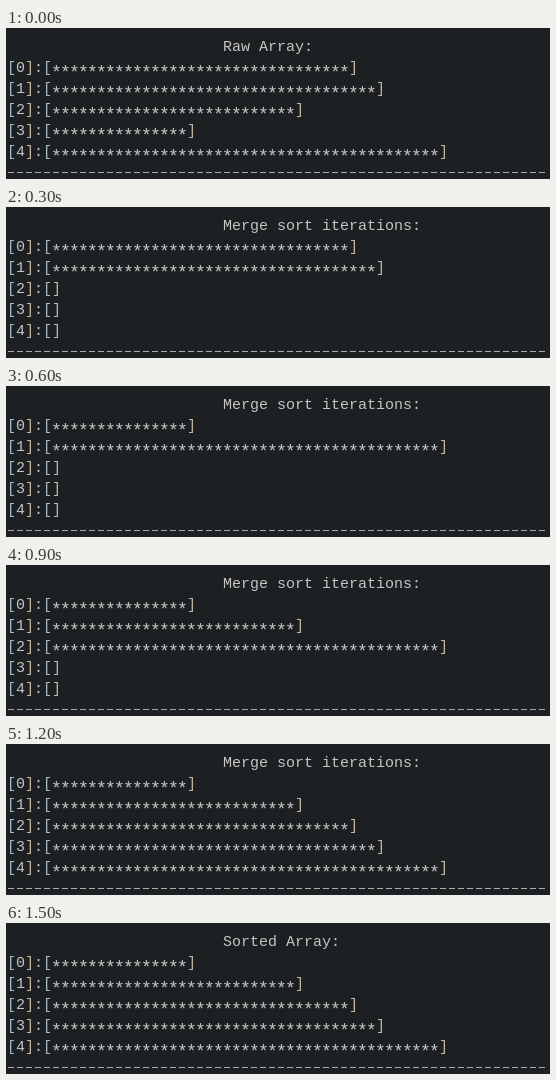
These frames come from a looping animation (544 px wide and 151 px high, 1.8 s). An HTML page with a canvas:

```html
<!DOCTYPE html>
<html lang="en">
<head>
<meta charset="utf-8">
<title>Merge sort</title>
<style>
  html, body { margin: 0; width: 100%; height: 100%; overflow: hidden; background: #1c2023; }
  canvas { display: block; }
</style>
</head>
<body>
<canvas id="stage" width="544" height="151"></canvas>
<script>
const ctx = document.getElementById('stage').getContext('2d', { alpha: false });
const CELL = 9, LINE = 21, LEFT = 1, BASE = 23;
const STEP = 300;
const INK = '#c6c6c1';
const tint = { '[': '#a3b8c4', ']': '#c4b7a0' };
const MERGE = 'Merge sort iterations:';
const steps = [
  ['Raw Array:', [33, 36, 27, 15, 43]],
  [MERGE, [33, 36]],
  [MERGE, [15, 43]],
  [MERGE, [15, 27, 43]],
  [MERGE, [15, 27, 33, 36, 43]],
  ['Sorted Array:', [15, 27, 33, 36, 43]]
];

const font = size => `${size}px "Liberation Mono", monospace`;
const colX = col => LEFT + col * CELL;

function write(text, col, row) {
  ctx.font = font(15);
  ctx.textAlign = 'left';
  [...text].forEach((ch, i) => {
    ctx.fillStyle = tint[ch] || INK;
    ctx.fillText(ch, colX(col + i), BASE + row * LINE);
  });
}

// Larger stars, lowered to sit in the middle of the line.
function stars(count, col, row) {
  ctx.font = font(18);
  ctx.textAlign = 'center';
  ctx.fillStyle = INK;
  for (let i = 0; i < count; i++) {
    ctx.fillText('*', colX(col + i + 0.5), BASE + row * LINE + 6);
  }
}

function rule(y) {
  ctx.strokeStyle = '#a9aaa7';
  ctx.setLineDash([6, 3]);
  ctx.beginPath();
  ctx.moveTo(LEFT + 1, y);
  ctx.lineTo(colX(60), y);
  ctx.stroke();
}

function draw(step) {
  const [title, values] = steps[step];
  ctx.fillStyle = '#1c2023';
  ctx.fillRect(0, 0, 544, 151);
  write(title, 24, 0);
  for (let i = 0; i < 5; i++) {
    const n = values[i] || 0;
    write(`[${i}]:[`, 0, i + 1);
    stars(n, 5, i + 1);
    write(']', 5 + n, i + 1);
  }
  rule(144.5);
}

const start = performance.now();
let shown = -1;
function tick() {
  const step = Math.floor((performance.now() - start) / STEP) % steps.length;
  if (step !== shown) draw(shown = step);
  requestAnimationFrame(tick);
}
tick();
</script>
</body>
</html>
```
